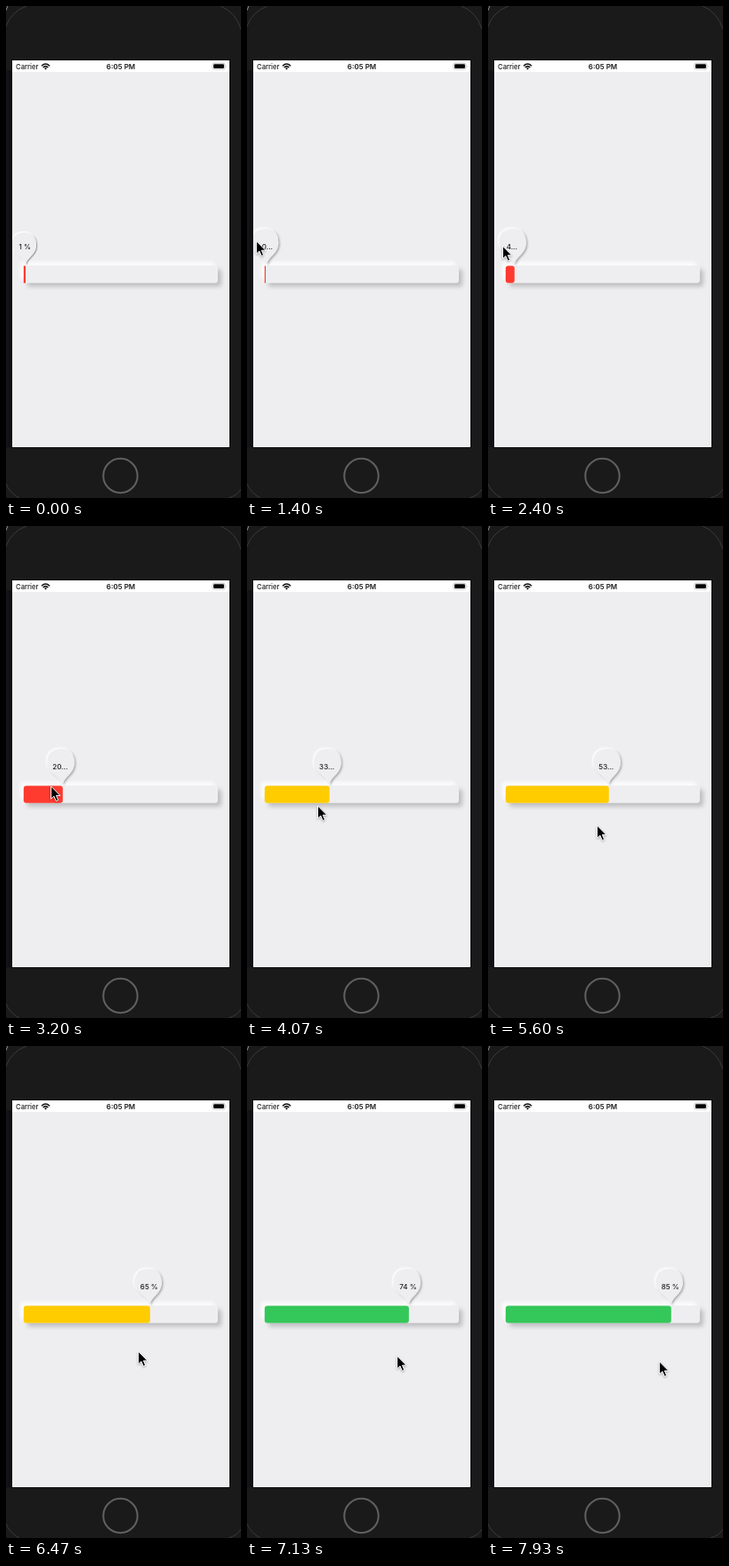
Recreate the animation shown at these times as an HTML page. Size 264 by 552 pixels, loop 8 s.

```html
<!DOCTYPE html>
<html lang="en">
<head>
<meta charset="utf-8">
<title>Progress slider</title>
<style>
html, body { margin: 0; width: 100%; height: 100%; overflow: hidden; background: #1a1a1b; }
svg { display: block; width: 264px; height: 552px; }
text { font-family: Inter, Roboto, sans-serif; font-weight: 500; fill: #1c1c1e; }
.cursor { filter: drop-shadow(0 1px 1px rgba(0,0,0,.3)); }
</style>
</head>
<body>
<svg viewBox="0 0 264 552">
  <defs>
    <linearGradient id="edge">
      <stop offset="0" stop-color="#15161c"/>
      <stop offset="1" stop-color="#0b0b0e"/>
    </linearGradient>
    <clipPath id="screen"><rect x="7" y="61" width="244" height="434"/></clipPath>
    <!-- raised look: light from the top left, shade to the bottom right -->
    <filter id="raisedTrack" x="-10%" y="-100%" width="120%" height="300%" color-interpolation-filters="sRGB">
      <feDropShadow dx="4" dy="4" stdDeviation="2.5" flood-opacity=".2" result="shade"/>
      <feDropShadow in="SourceGraphic" dx="-4" dy="-4" stdDeviation="2.5" flood-color="#fff" flood-opacity=".9" result="light"/>
      <feMerge><feMergeNode in="light"/><feMergeNode in="shade"/></feMerge>
    </filter>
    <filter id="raisedBubble" x="-20%" y="-20%" width="140%" height="140%" color-interpolation-filters="sRGB">
      <feDropShadow dx="1.4" dy="1.2" stdDeviation=".8" flood-opacity=".32" result="shade"/>
      <feDropShadow in="SourceGraphic" dx="-1.2" dy="-1.2" stdDeviation=".8" flood-color="#fff" result="light"/>
      <feMerge><feMergeNode in="shade"/><feMergeNode in="light"/></feMerge>
    </filter>
  </defs>

  <!-- phone body -->
  <rect width="264" height="552" fill="#1a1a1b"/>
  <rect y="72" width="7" height="423" fill="url(#edge)"/>
  <g fill="none" stroke="#3a3a3c">
    <path d="M0 23Q5 7 23 0M241 0Q258 7 264 26M0 536Q4 546 15 552M250 552Q260 549 264 542"/>
    <path d="M0 5L2 0" stroke="#8a8a8c"/>
  </g>
  <rect x="6.5" y="60.5" width="245" height="435" fill="none" stroke="#0a0a0b"/>
  <circle cx="128.5" cy="527" r="19.2" fill="#1a1a1b" stroke="#606061" stroke-width="2"/>

  <!-- screen -->
  <g clip-path="url(#screen)">
    <rect x="7" y="61" width="244" height="434" fill="#eeeef0"/>
    <rect x="7" y="61" width="244" height="13" fill="#fff"/>
    <text x="11" y="70.7" font-size="7.7">Carrier</text>
    <text x="129" y="70.8" font-size="8" style="font-weight:600" text-anchor="middle">6:05 PM</text>
    <g fill="none" stroke="#111" stroke-width="1.6">
      <path d="M40 67.2Q44.5 62.8 49 67.2M41.7 69Q44.5 66.4 47.3 69"/>
      <path d="M44.5 71.5L43 69.9Q44.5 68.7 46 69.9Z" fill="#111" stroke="none"/>
    </g>
    <rect x="232" y="64.3" width="14" height="6.8" rx="1.8" fill="none" stroke="#aaa" stroke-width=".7"/>
    <rect x="233.1" y="65.3" width="11.8" height="4.8" rx="1" fill="#000"/>
    <path d="M247 66.5q1 1.2 0 2.4z" fill="#999"/>

    <rect x="20" y="291.5" width="218" height="19.3" rx="3" fill="#eeeef0" filter="url(#raisedTrack)"/>
    <rect id="fill" x="19.8" y="291.5" height="19.3"/>
    <g id="bubble">
      <path filter="url(#raisedBubble)" fill="#eeeef0" d="M0 0C.5 -9 13 -12 13 -25C13 -36 7 -40.5 -2 -40.5C-12 -40.5 -17.5 -35 -17.5 -25C-17.5 -13 -1.5 -10 0 0Z"/>
    </g>
    <text id="label" y="272.6" font-size="8" text-anchor="middle"></text>
  </g>

  <g id="cursor">
    <path class="cursor" d="M0 0V14.2L3.3 11.2L5.7 16.6L8.1 15.6L5.8 10.4H10.3Z" stroke="#fff"/>
  </g>
</svg>
<script>
const LOOP = 8000, FPS = 15, LEFT = 20, WIDTH = 218;
const SHOW = 130, PRESS = 1070, GRIP = 12.8;
// pointer path: time, x, y
const PATH = [
  [SHOW, 214, 305], [870, 17, 267], [PRESS, 17, 267], [2000, 0, 258],
  [3200, 51, 292], [4070, 80, 314], [5600, 123, 336], [7930, 193, 354]
];
const [fill, bubble, label, cursor] =
  ["fill", "bubble", "label", "cursor"].map(id => document.getElementById(id));

const clamp = (v, lo, hi) => Math.min(hi, Math.max(lo, v));

function set(el, attrs) {
  for (const name in attrs) el.setAttribute(name, attrs[name]);
}

function pointer(t) {
  const next = PATH.findIndex(p => p[0] > t);
  const i = next < 0 ? PATH.length - 1 : Math.max(1, next);
  const [t0, x0, y0] = PATH[i - 1], [t1, x1, y1] = PATH[i];
  const u = clamp((t - t0) / (t1 - t0), 0, 1);
  return [x0 + (x1 - x0) * u, y0 + (y1 - y0) * u];
}

function caption(percent) {
  if (percent < 1) return percent > .8 ? "1 %" : "0.0...";
  return Math.round(percent) + (percent < 60 ? "..." : " %");
}

function draw(now) {
  const step = Math.floor((now % LOOP) * FPS / 1000 + .1);
  const t = step * 1000 / FPS;
  const [x, y] = pointer(t);
  const end = t <= PRESS ? 22 : Math.max(x + GRIP, t < 2000 ? 0 : 21);
  const right = t > PRESS && t < 2000 ? 21 : end;
  const percent = (right - LEFT) / WIDTH * 100;
  const tip = Math.max(right, 22.3);
  const scale = .9 + .1 * clamp((t - PRESS) / 250, 0, 1);
  const width = right - LEFT + .2;

  set(fill, {
    width,
    rx: width > 6 ? 3 : 0,
    fill: percent < 30 ? "#ff3b30" : percent < 70 ? "#ffcc00" : "#34c759"
  });
  set(bubble, { transform: `translate(${tip} 290.5) scale(${scale})` });

  const text = caption(percent);
  label.textContent = text;
  set(label, { x: tip - (text.endsWith(".") ? 3 : 1) });

  set(cursor, {
    visibility: t < SHOW ? "hidden" : "visible",
    transform: `translate(${x - .4} ${y})`
  });
}

let start = null;
function tick(now) {
  if (start === null) start = now;
  draw(now - start);
  requestAnimationFrame(tick);
}
draw(0);
requestAnimationFrame(tick);
</script>
</body>
</html>
```
